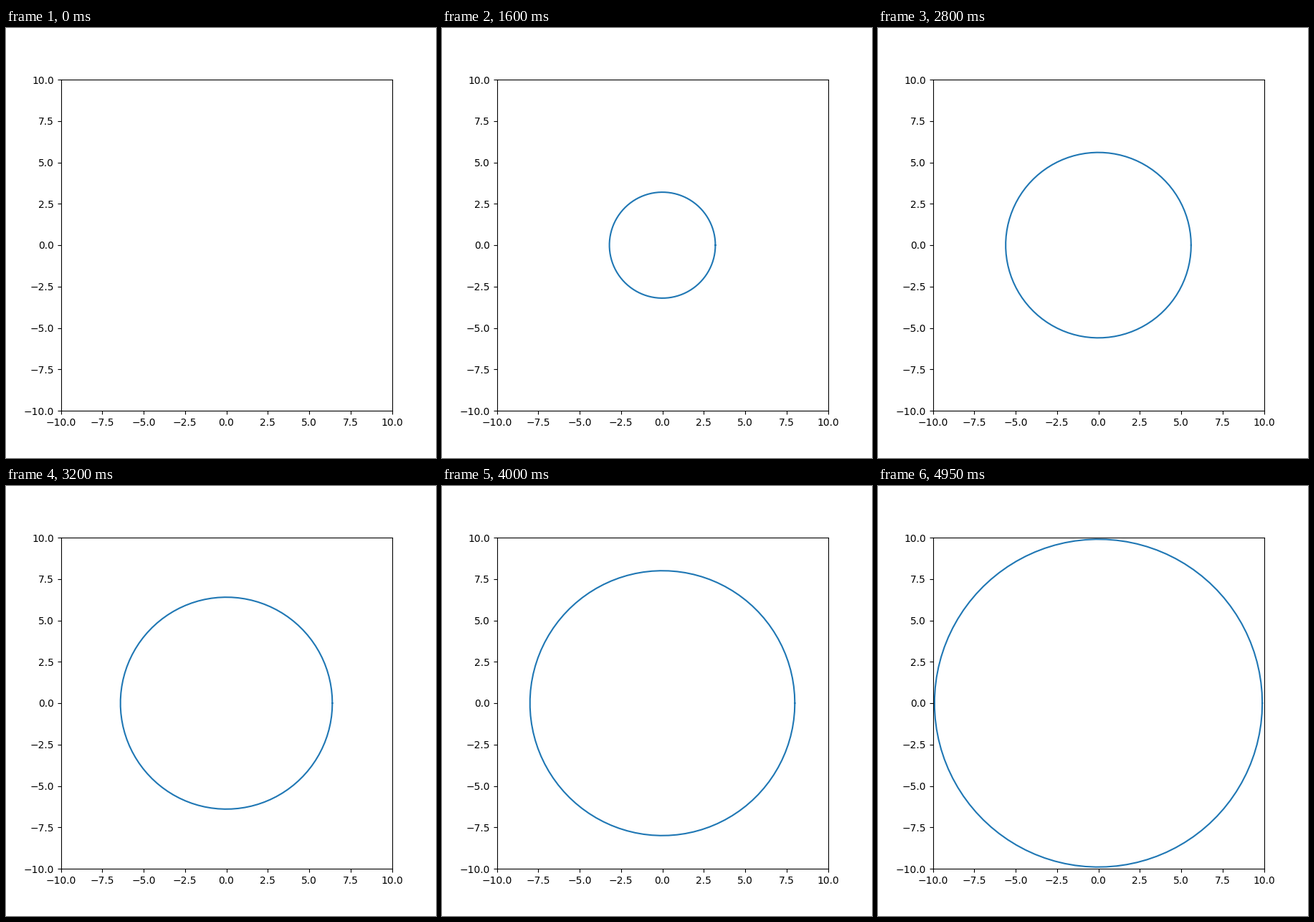
A matplotlib script for the animation above (5000 ms loop, 600 by 600 pixels).

```python
import numpy as np
import matplotlib.pyplot as plt
from matplotlib.animation import FuncAnimation

FRAMES = 100
INTERVAL = 50  # ms
GROWTH = 0.1   # radius gained per step

fig, ax = plt.subplots(figsize=(6, 6), dpi=100)
ax.set_aspect("equal")
ax.set_xlim(-10, 10)
ax.set_ylim(-10, 10)

theta = np.linspace(0, 2 * np.pi, 100)
circle, = ax.plot([], [])


def update(step):
    radius = GROWTH * step
    circle.set_data(radius * np.cos(theta), radius * np.sin(theta))
    circle.set_visible(step > 0)
    return circle,


anim = FuncAnimation(fig, update, frames=FRAMES, interval=INTERVAL,
                     repeat=True, repeat_delay=0)
plt.show()
```
